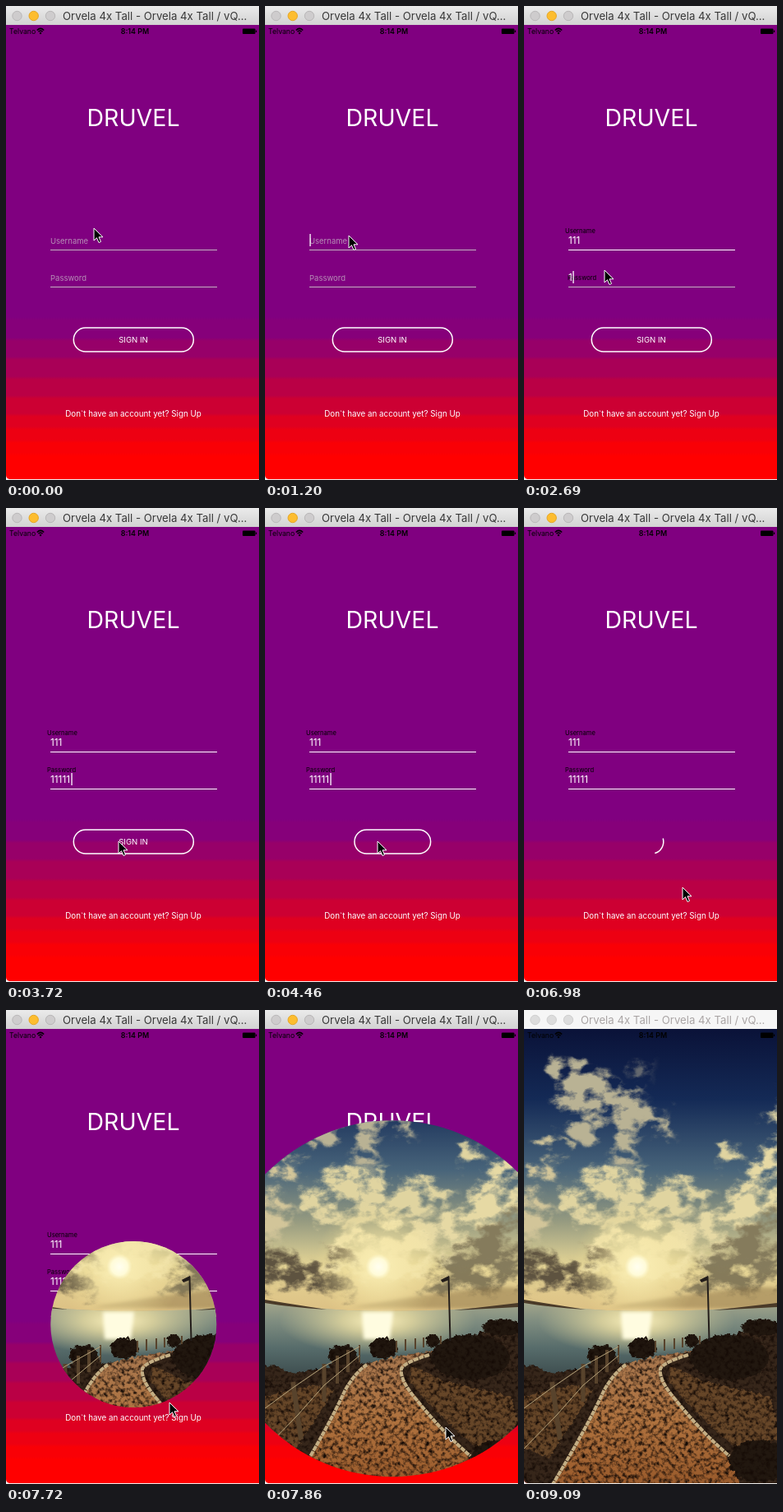
An HTML page for the animation above (9.19 s loop, 308 px wide and 576 px high).

```html
<!DOCTYPE html>
<html lang="en">
<head>
<meta charset="utf-8">
<title>Sign in</title>
<style>
  html, body { margin: 0; width: 100%; height: 100%; overflow: hidden; background: #eee; }
  svg { display: block; width: 308px; height: 576px; font-family: Inter, "Open Sans", sans-serif; }
  text { white-space: pre; }
  filter { color-interpolation-filters: sRGB; }
  .mid { text-anchor: middle; }
  .line { fill: none; stroke: #fff; }
</style>
</head>
<body>
<svg viewBox="0 0 308 576">
  <defs>
    <linearGradient id="dusk" gradientUnits="userSpaceOnUse" x1="0" y1="0" x2="0" y2="576"></linearGradient>
    <linearGradient id="chrome" x2="0" y2="1">
      <stop stop-color="#ebebeb"/><stop offset="1" stop-color="#d2d2d2"/>
    </linearGradient>
    <linearGradient id="sky" gradientUnits="userSpaceOnUse" x1="0" y1="23" x2="0" y2="366">
      <stop stop-color="#0a1238"/><stop offset=".25" stop-color="#142a56"/>
      <stop offset=".5" stop-color="#48647a"/><stop offset=".68" stop-color="#959a80"/>
      <stop offset=".84" stop-color="#e6d696"/><stop offset="1" stop-color="#dcc084"/>
    </linearGradient>
    <linearGradient id="sea" x2="0" y2="1">
      <stop stop-color="#a5a78c"/><stop offset=".25" stop-color="#7f8d80"/>
      <stop offset=".6" stop-color="#566b6a"/><stop offset="1" stop-color="#39484a"/>
    </linearGradient>
    <linearGradient id="path" x2="0" y2="1">
      <stop stop-color="#a87850"/><stop offset=".5" stop-color="#b0733f"/><stop offset="1" stop-color="#98592a"/>
    </linearGradient>
    <radialGradient id="glow">
      <stop stop-color="#fffef0"/><stop offset=".13" stop-color="#fffbd8"/>
      <stop offset=".2" stop-color="#f9ecb0" stop-opacity=".8"/><stop offset="1" stop-color="#f0dc90" stop-opacity="0"/>
    </radialGradient>
    <radialGradient id="shine">
      <stop stop-color="#fff4c0"/><stop offset=".35" stop-color="#f0e2a4" stop-opacity=".75"/>
      <stop offset="1" stop-color="#d8cf98" stop-opacity="0"/>
    </radialGradient>
    <filter id="fluff" x="-10%" y="-10%" width="120%" height="120%">
      <feTurbulence type="fractalNoise" baseFrequency=".035 .05" numOctaves="5" seed="4" result="noise"/>
      <feColorMatrix values="0 0 0 0 0 0 0 0 0 0 0 0 0 0 0 4.5 0 0 0 -1.45" result="gaps"/>
      <feGaussianBlur in="SourceGraphic" stdDeviation="3"/>
      <feDisplacementMap in2="noise" scale="40" xChannelSelector="R" yChannelSelector="G"/>
      <feComposite in2="gaps" operator="in"/>
    </filter>
    <filter id="grain" x="-5%" y="-5%" width="110%" height="110%">
      <feTurbulence type="fractalNoise" baseFrequency=".2" numOctaves="3" seed="7" result="noise"/>
      <feColorMatrix values="0 0 0 0 .08 0 0 0 0 .04 0 0 0 0 .02 2.5 0 0 0 -1.05" result="specks"/>
      <feDisplacementMap in="SourceGraphic" in2="noise" scale="7" xChannelSelector="R" yChannelSelector="G" result="shape"/>
      <feComposite in="specks" in2="shape" operator="atop"/>
    </filter>
    <filter id="soft" x="-20%" y="-20%" width="140%" height="140%"><feGaussianBlur stdDeviation="2"/></filter>
    <clipPath id="window"><path d="M0 0H308V575H4Q0 574 0 570Z"/></clipPath>
    <clipPath id="screen"><path d="M0 23H308V576H0Z"/></clipPath>
    <clipPath id="hole"><circle id="reveal" cx="155.3"/></clipPath>
  </defs>

  <g clip-path="url(#window)">
    <rect y="23" width="308" height="553" fill="url(#dusk)"/>
    <text class="mid" x="155" y="145.700" font-size="28.500" fill="#fff">DRUVEL</text>
    <g id="form"></g>
    <rect id="button" class="line" y="391" height="29" rx="14.5" stroke-width="1.5"/>
    <text id="signIn" class="mid" x="155" y="409" font-size="9.6" fill="#fff">SIGN IN</text>
    <path id="spinner" class="line" d="M14.5 0A14.5 14.5 0 0 1 0 14.5" stroke-width="1.5"/>
    <text class="mid" x="155" y="499" font-size="9.8" fill="#fff">Don`t have an account yet? Sign Up</text>

    <g clip-path="url(#screen)"><g id="photo" clip-path="url(#hole)">
      <rect y="23" width="308" height="350" fill="url(#sky)"/>
      <g filter="url(#fluff)" fill="#d2c599">
        <path fill="#b9b294" d="M32 52Q48 44 66 66Q100 70 120 96Q150 92 150 118Q188 124 182 154Q152 152 148 138Q134 152 140 190Q108 187 92 167Q62 152 50 135Q36 100 32 52Z"/>
        <path fill="#b9b294" opacity=".5" d="M132 74L157 54L152 88Z"/>
        <path d="M6 158q27-12 62 2q-3 18-28 14zM4 195q16-30 44-4q0 24-25 20zM-6 226Q20 214 42 245Q30 276-6 280z"/>
        <path fill="#e0d4a0" d="M40 235Q70 190 100 190Q140 188 160 212Q195 192 234 224Q215 252 178 250Q150 275 110 262Q60 268 40 235ZM238 168l24 0l8 18l-28 4z"/>
        <path fill="#e6d9a4" d="M314 100Q280 140 297 172Q255 212 243 246Q195 246 158 268Q185 310 314 320Z"/>
        <path fill="#f1e4ae" d="M90 275Q140 245 190 270Q220 290 190 325H90Q60 300 90 275Z"/>
        <path fill="#756b50" opacity=".85" d="M235 292Q270 255 314 245V340L175 345Q200 315 235 292Z"/>
        <path fill="#5e5340" d="M-8 282Q40 290 60 314Q100 322 112 346L-8 340ZM68 298q30-6 48 10q-20 10-48-8z"/>
      </g>
      <path fill="#8d7548" opacity=".5" filter="url(#soft)" d="M105 361Q190 346 235 342Q275 334 312 338V364Z"/>
      <circle cx="138" cy="312" r="78" fill="url(#glow)"/>
      <path fill="url(#sea)" d="M0 354Q60 365 140 366Q240 366 308 357V450H0Z"/>
      <ellipse cx="137" cy="378" rx="120" ry="42" fill="url(#shine)" clip-path="url(#water)"/>
      <path fill="#fffce0" filter="url(#soft)" d="M118 367H156L152 400H120Z"/>
      <path fill="#4a3a28" d="M0 352L24 356L75 364Q30 361 0 356ZM230 365L308 356V361Z"/>
      <g filter="url(#grain)">
        <path fill="#36261a" d="M-8 434L12 432L32 442L78 434Q90 400 108 412L116 430L170 424L240 402L268 390Q285 372 316 382V584H-8Z"/>
        <path fill="#664628" d="M178 432L216 450L300 470L312 520L262 535Q205 490 176 450ZM-4 470L60 456L84 462L30 545L-4 530Z"/>
        <path fill="url(#path)" d="M32 580Q78 505 96 465Q112 438 124 430L165 420L206 414Q180 424 168 433Q160 448 182 470Q215 512 246 540Q258 556 262 580Z"/>
      </g>
      <path fill="none" stroke="#c3ae84" stroke-width="4" stroke-dasharray="6 1" d="M34 578Q78 505 97 463Q110 440 124 431M200 419Q170 428 166 436Q164 450 184 473Q215 512 250 542"/>
      <g fill="#21170f" filter="url(#grain)">
        <ellipse cx="144" cy="411" rx="17" ry="13"/><ellipse cx="204" cy="402" rx="8" ry="8"/>
        <ellipse cx="94" cy="419" rx="17" ry="12"/>
        <ellipse cx="288" cy="386" rx="24" ry="10"/><ellipse cx="250" cy="422" rx="48" ry="28"/>
        <ellipse cx="285" cy="548" rx="36" ry="26"/>
      </g>
      <g fill="none" stroke="#58432c">
        <path stroke-width="6" d="M34 452L44 522"/><path stroke-width="5" d="M72 430V476"/>
        <path stroke-width="4" d="M88 420V454M101 413V440"/>
        <path stroke-width="2" d="M115 407V428M160 402V416M171 400V414M183 399V412M193 398V410M214 396V406"/>
        <path stroke="#b5a27a" stroke-width="1" d="M0 484L34 459L72 433L115 409M0 533L40 492L72 456L115 420"/>
      </g>
      <path fill="none" stroke="#231d1a" stroke-width="2" d="M225.5 402L223.5 325L215 329"/>
      <path fill="#231d1a" d="M214 328L224 323V328L216 331Z"/>
    </g></g>

    <g>
      <text x="4" y="34" font-size="8.7">Telvano</text>
      <path fill="none" stroke="#000" stroke-width="1.5" d="M37.8 29.5Q42 25.3 46.2 29.5M39.4 31.3Q42 28.8 44.6 31.3"/>
      <circle cx="42" cy="33" r="1.2"/>
      <text class="mid" x="157" y="34" font-size="8.9" font-weight="600">8:14 PM</text>
      <rect x="288" y="27.5" width="15.5" height="6.5" rx="1"/><rect x="304" y="29.5" width="1.2" height="2.5"/>
    </g>

    <rect id="bar" width="308" height="23"/>
    <circle class="light" cx="13.5" cy="12" r="5.7"/>
    <circle class="light" cx="33.7" cy="12" r="5.7"/>
    <circle class="light" cx="54" cy="12" r="5.7"/>
    <text id="caption" x="69" y="17" font-size="13.2">Orvela 4x Tall - Orvela 4x Tall / vQ...</text>
    <path id="pointer" d="M0 0V15L3.5 11.7L6 17.5L8.5 16.4L6 10.8H11Z" stroke="#fff"/>
  </g>
  <clipPath id="water"><path d="M0 354Q60 365 140 366Q240 366 308 357V450H0Z"/></clipPath>
</svg>

<script>
const LOOP = 9190;
const $ = id => document.getElementById(id);
const set = (el, attrs) => { for (const k in attrs) el.setAttribute(k, attrs[k]); };
const show = (el, on) => set(el, { visibility: on ? 'visible' : 'hidden' });
const add = (parent, tag, attrs) => {
  const el = document.createElementNS('http://www.w3.org/2000/svg', tag);
  set(el, attrs);
  return parent.appendChild(el);
};
const clamp = v => Math.max(0, Math.min(1, v));
const smooth = v => v * v * (3 - 2 * v);

const shortBeats = new Set([17, 20, 23, 28, 31, 43, 45, 51, 52, 54]);
const starts = [0];
for (let n = 0; n < 58; n++) starts.push(starts[n] + (shortBeats.has(n) ? 140 : 150));
starts.push(9090);
const LAST = starts.length - 1;

// Rows are [beat, x, y].
const pointerPath = [
  [3, 107, 270], [4, 106, 273], [6, 102, 279], [11, 102, 279], [14, 98, 321],
  [22, 98, 321], [25, 137, 405], [30, 137, 405], [33, 166, 441], [36, 187, 457],
  [40, 193, 461], [50, 193, 461], [52, 199, 477], [53, 220, 507], [56, 255, 560],
  [57, 262, 567], [58, 275, 590]
];
const radii = [[49, 14], [50, 19], [51, 43], [52, 101], [53, 216.5], [54, 400]];

function along(rows, n) {
  const i = rows.findIndex(r => r[0] >= n);
  if (i < 0) return rows[rows.length - 1].slice(1);
  if (i === 0) return rows[0].slice(1);
  const a = rows[i - 1], b = rows[i], p = (n - a[0]) / (b[0] - a[0]);
  return a.slice(1).map((v, k) => v + (b[k + 1] - v) * p);
}

// Banded purple to red: [top of band, share of red].
[[380, .05], [405, .18], [428, .32], [452, .46], [475, .6], [497, .75], [513, .86], [529, .95], [545, 1]]
  .forEach(([y, mix], i, all) => {
    const colour = m => `rgb(${128 + 127 * m},0,${128 - 128 * m})`;
    add($('dusk'), 'stop', { offset: (y - 2) / 576, 'stop-color': colour(i ? all[i - 1][1] : 0) });
    add($('dusk'), 'stop', { offset: (y + 2) / 576, 'stop-color': colour(mix) });
  });

function makeField(name, y, first, count) {
  const form = $('form');
  const label = add(form, 'text', {});
  label.textContent = name;
  const value = add(form, 'text', { x: 54, y: y + 4.2, 'font-size': 11.8, fill: '#fff' });
  const rule = add(form, 'rect', { x: 54, y: y + 11, width: 203, height: 1 });
  return n => {
    const age = n - first, typed = Math.max(0, Math.min(count, age + 1));
    const rise = clamp(age / 2);
    set(label, age < 0
      ? { x: 54, y: y + 3.6, 'font-size': 9.5, fill: '#b58db5' }
      : { x: 53 - 3 * rise, y: y + 2.8 - 12 * rise, 'font-size': 7.6, fill: '#000' });
    set(rule, { fill: age < 1 ? '#c3b2c0' : '#fff' });
    value.textContent = '1'.repeat(typed);
    return 54.4 + 5 * typed;
  };
}
const username = makeField('Username', 285, 12, 3);
const password = makeField('Password', 330, 18, 5);
const caret = add($('form'), 'rect', { width: 1.3, height: 15, fill: '#fff' });
const lights = document.querySelectorAll('.light');

function draw(n) {
  const userX = username(n), passX = password(n);
  const inPassword = n >= 16;
  const blinkOff = n > 22 && Math.floor((n - 22) / 3.4) % 2 === 1;
  set(caret, { x: inPassword ? passX : userX, y: inPassword ? 322 : 277 });
  show(caret, n >= 8 && !blinkOff);

  const width = 146 - 117 * smooth(clamp((n - 26.8) / 6.8));
  set($('button'), { x: 155.3 - width / 2, width });
  show($('button'), n < 34);
  show($('signIn'), n < 26);

  const turn = -16 + (starts[n] - 6980) * .36;
  set($('spinner'), { transform: `translate(155.3 405.5) rotate(${turn})` });
  show($('spinner'), n >= 34 && n < 50);

  const [r] = along(radii, n);
  set($('reveal'), { r, cy: 405.5 - .272 * (r - 15) });
  $('photo').style.display = n < 50 ? 'none' : '';

  const [x, y] = along(pointerPath, n);
  set($('pointer'), { transform: `translate(${x} ${y})` });
  show($('pointer'), n < 58);

  const idle = n === LAST;
  set($('bar'), { fill: idle ? '#f6f6f6' : 'url(#chrome)' });
  set($('caption'), { fill: idle ? '#aaa5a5' : '#383838' });
  lights.forEach((el, i) => set(el, idle
    ? { fill: '#dcdcdc', stroke: '#cfcfcf' }
    : i === 1 ? { fill: '#fdbd2f', stroke: '#e5a623' } : { fill: '#cecccd', stroke: '#b9b7b8' }));
}

let shown = -1;
function tick() {
  const t = performance.now() % LOOP;
  let n = LAST;
  while (starts[n] > t) n--;
  if (n !== shown) draw(shown = n);
  requestAnimationFrame(tick);
}
tick();
</script>
</body>
</html>
```
